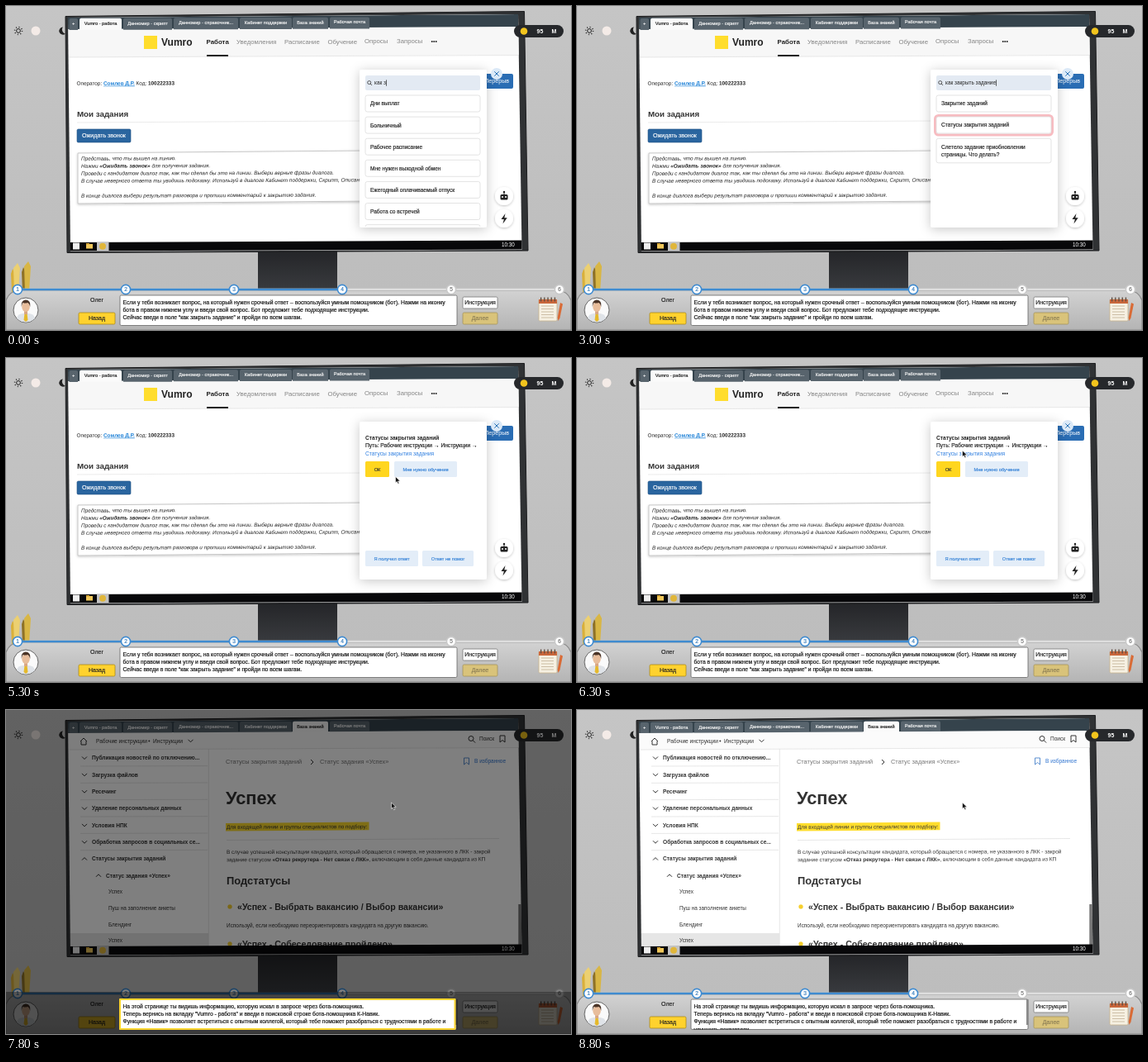
An HTML page that plays this animation: 684 by 392 pixels, repeating every 8900 ms.

```html
<!DOCTYPE html>
<html lang="ru">
<head>
<meta charset="utf-8">
<style>
html, body { margin: 0; width: 100%; height: 100%; overflow: hidden; background: #c3c3c3 }
svg { display: block; width: 100%; height: 100% }
text { font-family: "Liberation Sans", Arial, sans-serif; white-space: pre }
.m { stroke: currentColor; stroke-width: .18 }
.line { fill: none; stroke: #333; stroke-width: 1 }
</style>
</head>
<body>
<svg id="stage" viewBox="0 0 684 392"></svg>
<script>
const LOOP = 8900;
const $ = id => document.getElementById(id);
const clamp = v => Math.max(0, Math.min(1, v));
const ease = (t, a, b) => { const p = clamp((t - a) / (b - a)); return p * p * (3 - 2 * p); };

// y is the vertical middle of the line
const text = (x, y, size, str, fill = '#222', more = '') =>
  `<text x="${x}" y="${(y + size * .35).toFixed(2)}" font-size="${size}" fill="${fill}" color="${fill}" ${more}>${str}</text>`;
const rect = (x, y, w, h, fill, more = '') =>
  `<rect x="${x}" y="${y}" width="${w}" height="${h}" fill="${fill}" ${more}/>`;
const disc = (x, y, r, fill, more = '') => `<circle cx="${x}" cy="${y}" r="${r}" fill="${fill}" ${more}/>`;
const path = (d, more = '') => `<path d="${d}" ${more}/>`;
const line = (x1, y1, x2, y2, color = '#ddd', w = .7) =>
  path(`M${x1} ${y1}L${x2} ${y2}`, `stroke="${color}" stroke-width="${w}" fill="none"`);
const group = (id, body, more = '') => `<g id="${id}" ${more}>${body}</g>`;
const bold = 'font-weight="700"', mid = 'text-anchor="middle"', medium = 'class="m"';
const tilt = (x, y, a = -.2) => `transform="rotate(${a} ${x} ${y})"`;
const button = (x, y, w, h, label, fill, color, size, more = '') =>
  rect(x, y, w, h, fill, 'rx="1.5" ' + more) + text(x + w / 2, y + h / 2, size, label, color, mid + ' ' + medium);
const chevron = (x, y, up) => {
  const k = up ? -1 : 1;
  return path(`M${x - 3} ${y - 1.5 * k}l3 ${3 * k}l3 ${-3 * k}`, 'class="line"');
};
const lens = (x, y, r, w) => disc(x, y, r, 'none', `stroke="#333" stroke-width="${w}"`) +
  line(x + r * .7, y + r * .7, x + r * 1.7, y + r * 1.7, '#333', w);
const bookmark = (x, y, color) => path(`M${x - 3} ${y - 4}h6v8l-3 -2.5l-3 2.5z`, `fill="none" stroke="${color}"`);

const tabs = [[89, 51, 'Vumro - работа'], [142, 59, 'Данномир - скрипт'], [203, 78, 'Данномир - справочник...'],
  [283, 63, 'Кабинет поддержки'], [347, 43, 'База знаний'], [392, 48, 'Рабочая почта']];

function tabBar(active) {
  const tab = (x, w, label, on) => {
    const y = 14.9 - (x - 82) * .0045;
    return path(`M${x} ${y + 14}V${y + 2}q0 -2 2 -2h${w - 4}q2 0 2 2v12z`, `fill="${on ? '#fafafa' : '#58646d'}"`) +
      text(x + w / 2, y + 6, 5.65, label, on ? '#222' : '#f4f4f4', mid + ' ' + medium);
  };
  return path('M75 14L620 10V25L75 28z', 'fill="#35434c"') + tab(76.5, 10.5, '+', false) +
    tabs.map(([x, w, label], i) => tab(x, w, label, i === active)).join('');
}

function workPage() {
  const menu = [[279, 'Уведомления'], [337, 'Расписание'], [389.5, 'Обучение'], [434, 'Опросы'], [473, 'Запросы']];
  const brief = [[184.5, 'Представь, что ты вышел на линию.'],
    [193.5, `Нажми <tspan ${bold}>«Ожидать звонок»</tspan> для получения задания.`],
    [202.5, 'Проведи с кандидатом диалог так, как ты сделал бы это на линии. Выбери верные фразы диалога.'],
    [211.5, 'В случае неверного ответа ты увидишь подсказку. Используй в диалоге Кабинет поддержки, Скрипт, Описание вакансии.'],
    [229.5, 'В конце диалога выбери результат разговора и пропиши комментарий к закрытию задания.']];
  return path('M76 28L621 25V59L76 62z', 'fill="#f7f7f7"') + line(76, 62, 621, 59.5) + tabBar(0) +
    rect(167, 36, 16, 16, '#ffdd2d') + text(188, 44, 12, 'Vumro', '#222', bold) +
    text(242.5, 43.3, 7.9, 'Работа', '#222', bold) + rect(243, 59, 26, 2, '#222') +
    menu.map(([x, s]) => text(x, 43.4 - (x - 243) * .004, 7.75, s, '#858585')).join('') +
    text(514.5, 43, 7, '•••', '#222') +
    text(85.5, 93.6, 6.4, `Оператор: <tspan fill="#1a7fd6" text-decoration="underline" ${bold}>Сомлев Д.Р.</tspan> Код: <tspan ${bold}>100222333</tspan>`, '#222', tilt(86, 94)) +
    text(86, 131, 9.75, 'Мои задания', '#333', bold) + line(86, 141, 430, 139, '#e2e2e2') +
    button(86, 149, 65, 16, 'Ожидать звонок', '#2a659f', '#fff', 7.1, 'stroke="#1d4f80" stroke-width=".6"') +
    path('M87 178L560 174V235L87 239z', 'fill="#fff" stroke="#bbb" stroke-width=".8" filter="url(#soft)"') +
    brief.map(([y, s]) => text(91, y, 6.4, s, '#222', 'font-style="italic" ' + tilt(91, y))).join('') +
    rect(570, 82, 44, 18, '#2a6db4', 'rx="2"') + text(609, 91, 7.1, 'Перерыв', '#fff', 'text-anchor="end"');
}

function botPanel() {
  const item = (y, ...rows) => rect(435, y, 139, rows.length * 9.5 + 10.5, '#fff', 'rx="2.5" stroke="#dcdcdc" stroke-width=".8"') +
    rows.map((s, i) => text(441, y + 10.2 + i * 9.5, 6.55, s, '#222', medium)).join('');
  const all = ['Дни выплат', 'Больничный', 'Рабочее расписание', 'Мне нужен выходной обмен',
    'Ежегодный оплачиваемый отпуск', 'Работа со встречей', 'Смена графика'];
  const soft = (x, y, w, s) => button(x, y, w, 19, s, '#e3edf8', '#3c86d8', 5.7);
  const search = rect(435, 84, 139, 18, '#e3eaf3', 'rx="2"') + lens(439.7, 92.6, 2, .8) +
    text(446, 93, 6.4, '', '#222', 'id="query"') + rect(0, 89.4, .7, 7.4, '#222', 'id="caret"');
  return rect(428, 77, 154, 191, '#fff', 'rx="3" filter="url(#shade)"') +
    group('list', search +
      group('all', all.map((s, i) => item(108 + i * 26.1, s)).join(''), 'clip-path="url(#panel)"') +
      group('found', item(108, 'Закрытие заданий') +
        rect(433.5, 132.5, 142, 23.5, 'none', 'id="glow" rx="4" stroke="#f7bcc1" stroke-width="3"') +
        item(134, 'Статусы закрытия заданий')) +
      group('third', item(160.3, 'Слетело задание приобновлении', 'страницы. Что делать?'))) +
    group('detail', text(435, 97, 6.6, 'Статусы закрытия заданий', '#222', bold) +
      text(435, 106, 6.65, 'Путь: Рабочие инструкции → Инструкции →', '#222', medium) +
      text(435, 115.3, 6.65, 'Статусы закрытия задания', '#2f7fe0') +
      button(435, 125, 29, 19, 'ОК', '#ffd61f', '#333', 5.7) + soft(470, 125, 76, 'Мне нужно обучение') +
      soft(435, 233, 64, 'Я получил ответ') + soft(504, 233, 62, 'Ответ не помог')) +
    disc(594, 82, 7, '#dbe9f7') + path('M591.3 79.3l5.4 5.4m0 -5.4l-5.4 5.4', 'stroke="#2b74b8"') +
    [230, 257].map(y => disc(603, y, 11, '#fff', 'filter="url(#soft)"')).join('') +
    rect(598.5, 228, 9, 6.5, '#222', 'rx="1.5"') + rect(602.5, 224.5, 1, 4, '#222') + disc(603, 225, 1.2, '#222') +
    disc(601, 231, 1, '#fff') + disc(605, 231, 1, '#fff') + path('M604.5 251l-5 7h3.3l-1.3 5.5l5.2 -7.2h-3.4z', 'fill="#222"');
}

function basePage() {
  const side = ['Публикация новостей по отключению...', 'Загрузка файлов', 'Ресечинг', 'Удаление персональных данных',
    'Условия НПК', 'Обработка запросов в социальных се...', 'Статусы закрытия заданий'];
  const leaves = ['Успех', 'Пуш на заполнение анкеты', 'Блендинг', 'Успех'];
  const star = y => path([0, 45, 90, 135].map(a => {
    const c = 2.8 * Math.cos(a * Math.PI / 180), s = 2.8 * Math.sin(a * Math.PI / 180);
    return `M${271 - c} ${y - s}L${271 + c} ${y + s}`;
  }).join(''), 'stroke="#f6cf2e" stroke-width="1.5"');
  return tabBar(4) + path('M76 28L621 25V45L76 48z', 'fill="#fbfbfb"') + line(77, 48, 621, 45.5) +
    path('M90 38l4 -4l4 4M91 37.5v4.5h6v-4.5', 'class="line"') +
    text(109, 37.7, 6.55, 'Рабочие инструкции', '#333') + disc(173.3, 37.6, 1, '#333') +
    text(178, 37.4, 6.65, 'Инструкции', '#333') + chevron(223.5, 37.3) +
    lens(563, 34.5, 3, 1) + text(573, 35, 6.5, 'Поиск', '#333') + bookmark(601, 35, '#333') +
    rect(78, 270, 167, 17, '#e6e6e6') + line(245.3, 47, 245.3, 286) +
    side.map((s, i) => {
      const y = 58 + i * 20.35;
      return chevron(95, y, i === 6) + text(104, y, 6.6, s, '#333', bold) + (i < 6 ? line(90, y + 10, 244, y + 9.6) : '');
    }).join('') +
    chevron(112, 200.3, true) + text(121, 200.3, 6.55, 'Статус задания «Успех»', '#333', bold) +
    leaves.map((s, i) => text(124, 220 + i * 19.65, 6.4, s, '#333')).join('') +
    text(266, 62.8, 7.35, 'Статусы закрытия заданий', '#777') +
    path('M369 60l3 3l-3 3', 'class="line"') + text(380, 62.4, 7.4, 'Статус задания «Успех»', '#777') +
    bookmark(557.5, 62, '#5b8fd0') + text(567, 62, 6.5, 'В избранное', '#2f74d0') +
    text(266, 106, 21.8, 'Успех', '#333', bold) +
    path('M266 137L439.5 135.6V145.2L266 146.6z', 'fill="#ffdd2d"') +
    text(267, 141.5, 6.42, 'Для входящей линии и группы специалистов по подбору:', '#333', tilt(267, 141)) +
    line(267, 157.5, 597, 155.5) +
    text(267, 171.8, 6.47, 'В случае успешной консультации кандидата, который обращается с номера, не указанного в ЛКК - закрой', '#333', tilt(267, 172, -.12)) +
    text(267, 181, 6.47, `задание статусом <tspan ${bold}>«Отказ рекрутера - Нет связи с ЛКК»</tspan>, включающим в себя данные кандидата из КП`, '#333', tilt(267, 181, -.12)) +
    text(267, 206, 12.9, 'Подстатусы', '#333', bold) +
    star(238) + text(280, 238, 10.6, '«Успех - Выбрать вакансию / Выбор вакансии»', '#333', bold) +
    text(267, 260.5, 6.45, 'Используй, если необходимо переориентировать кандидата на другую вакансию.', '#333') +
    star(283) + text(280, 283, 10.6, '«Успех - Собеседование пройдено»', '#333', bold) +
    rect(620.3, 235, 4, 50, '#777');
}

function room() {
  return rect(0, 0, 684, 392, 'url(#wall)') +
    disc(15, 30, 2.4, 'none', 'stroke="#222"') + disc(15, 30, 4.5, 'none', 'stroke="#222" stroke-width="1.5" stroke-dasharray="1 2.53"') +
    disc(36, 30, 5.5, '#f4ebe7') + path('M69 25.5a4.6 4.6 0 1 0 3 8a5 5 0 0 1 -3 -8z', 'fill="#222"') +
    rect(305, 294, 96, 52, 'url(#stand)') +
    path('M72 12.5L627.5 6.5L632 296L74 298.5z', 'fill="#303234" stroke="#1c1d1f"') +
    path('M75 14L620 10L624.5 295L78 297z', 'fill="#fff"');
}

function taskbar() {
  return path('M77.5 286L624.4 283.5V294.5L78 296.5z', 'fill="#08080a"') + rect(81, 286.5, 8, 8, '#eee') +
    rect(97, 288, 8, 5.5, '#f0c75a') + rect(97, 287, 4, 2, '#d9a93b') + rect(110, 285.6, 14.5, 10.4, '#c4c4c4') +
    disc(117, 290.7, 4, '#e0b63a') + text(608, 288.6, 6.3, '10:30', '#fff', mid) +
    rect(615, 23, 60, 15, '#26282b', 'rx="7.5"') + disc(627, 30.5, 4.3, '#f2c41d') +
    text(646.5, 30.5, 7, '95', '#fff', mid + ' ' + bold) + text(663.5, 30.5, 7, 'М', '#fff', mid + ' ' + bold);
}

function footer() {
  const step = (x, i) => disc(x, 343, 5.6, '#fff', `stroke="${i < 4 ? '#3f8bd0' : '#c9c9c9'}" stroke-width="1.6"`) +
    text(x, 343, 6.6, i + 1, i < 4 ? '#357cbd' : '#777', mid + ' ' + medium);
  const pencils = [[8, 318, '#d9b03a'], [14, 311, '#ecd071'], [21, 316, '#8f7226'], [27, 309, '#d8b645']];
  return pencils.map(([x, y, c], i) => path(`M${x} ${y}l3 6l${i % 2 ? -2 : 1} ${340 - y}h-5l-1 ${y - 340}z`, `fill="${c}"`)).join('') +
    path('M0 392V356Q4 345 16 344H668Q680 345 684 356V392z', 'fill="url(#desk)" stroke="#8b8b8b" stroke-width="1.2"') +
    line(14, 343, 670, 343, '#dedede', 2.5) + line(14, 343, 407, 343, '#3f8bd0', 2.5) +
    [14, 145, 276, 407, 539, 670].map(step).join('') +
    disc(24, 368, 15, '#fafafa', 'stroke="#666" stroke-width="1"') +
    path('M13 378q1 -6 8 -6h6q7 0 8 6q-11 9 -22 0z', 'fill="#dfe3e8"') + path('M22.5 372h3l1 8l-2.5 2l-2.5 -2z', 'fill="#e5b92b"') +
    rect(22, 367, 4, 6, '#d9a784') + '<ellipse cx="24" cy="364" rx="4.8" ry="6" fill="#e8bd9b"/>' +
    path('M18.7 364q-1 -8 5.3 -8.5q6.3 .5 5.3 8.5q-1 -4 -3 -5q-4 1 -6 0q-1 2 -1.6 5z', 'fill="#4b3427"') +
    text(110, 356, 7, 'Олег', '#222', mid + ' ' + medium) +
    button(88, 371, 44, 14, 'Назад', '#ffd22e', '#222', 7, 'stroke="#a98a1c" stroke-width=".8"') +
    button(553, 352, 42, 14, 'Инструкция', '#fdfdfd', '#222', 7, 'stroke="#777" stroke-width=".8"') +
    button(553, 371, 42, 14, 'Далее', '#d9c37a', '#8a7d55', 7, 'stroke="#a4945c" stroke-width=".8"') +
    rect(645, 355, 22, 26, '#f6f0e2', 'rx="1.5" stroke="#c8b48d" stroke-width=".8"') + rect(645, 355, 22, 5, '#c9673c') +
    [0, 1, 2, 3, 4].map(i => rect(647 + i * 4.2, 352.5, 1.3, 5, '#5c4a40') + line(648, 363 + i * 3.5, 663, 363 + i * 3.5, '#bba88c')).join('') +
    path('M671 359l3 1.5l-3.5 17l-2 3.5l-.8 -4z', 'fill="#d96b36"');
}

function dialog() {
  const rows = list => list.map((s, i) => text(141.5, 358.3 + i * 9.35, 6.75, s, '#111', medium)).join('');
  return rect(138, 350, 408, 36.5, '#fff', 'rx="1.5" stroke="#666" stroke-width=".8"') +
    group('tip1', rows(['Если у тебя возникает вопрос, на который нужен срочный ответ – воспользуйся умным помощником (бот). Нажми на иконку',
      'бота в правом нижнем углу и введи свой вопрос. Бот предложит тебе подходящие инструкции.',
      'Сейчас введи в поле “как закрыть задание” и пройди по всем шагам.'])) +
    group('tip2', rows(['На этой странице ты видишь информацию, которую искал в запросе через бота-помощника.',
      'Теперь вернись на вкладку "Vumro - работа" и введи в поисковой строке бота-помощника К-Навик.',
      'Функция «Навик» позволяет встретиться с опытным коллегой, который тебе поможет разобраться с трудностями в работе и',
      'улучшить показатели.']) + rect(544, 350, 2.5, 31, '#8a8a8a'), 'clip-path="url(#tip)"');
}

const hole = 'M137.5 349.5V387H544.5V349.5z" fill-rule="evenodd';

$('stage').innerHTML = `<defs>
  <linearGradient id="wall" x2="0" y2="1"><stop stop-color="#c5c5c5"/><stop offset="1" stop-color="#bcbcbc"/></linearGradient>
  <linearGradient id="stand" x2="0" y2="1"><stop stop-color="#232427"/><stop offset="1" stop-color="#3a3c40"/></linearGradient>
  <linearGradient id="desk" x2="0" y2="1"><stop stop-color="#d2d2d2"/><stop offset="1" stop-color="#b4b4b4"/></linearGradient>
  <filter id="soft" x="-30%" y="-30%" width="160%" height="160%"><feDropShadow dx="0" dy="1" stdDeviation="1.5" flood-opacity=".25"/></filter>
  <filter id="shade" x="-20%" y="-20%" width="140%" height="140%"><feDropShadow dx="0" dy="2" stdDeviation="7" flood-opacity=".22"/></filter>
  <clipPath id="screen"><path d="M75 14L620 10L624.5 290L78 290z"/></clipPath>
  <clipPath id="panel"><path d="M428 77h154v190h-154z"/></clipPath>
  <clipPath id="tip"><path d="M138 350h409v36.5h-409z"/></clipPath></defs>` +
  room() + group('view', group('work', workPage() + botPanel()) + group('base', basePage()), 'clip-path="url(#screen)"') +
  taskbar() + footer() + dialog() +
  group('dim', path('M0 0H684V392H0z' + hole, 'fill-opacity=".5"') + path('M0 341H684V392H0z' + hole, 'fill-opacity=".35"')) +
  path('M138 350H543.5V386H138z', 'id="ring" fill="none" stroke="#ffd52e" stroke-width="2" stroke-linejoin="round" pathLength="1"') +
  '<rect id="pulse" fill="none" stroke="#ffd52e" stroke-width="2" rx="3"/>' +
  path('M0 0v7.5l1.8 -1.6l1.3 2.9l1.4 -.6l-1.3 -2.8h2.5z', 'id="mouse" fill="#111" stroke="#fff" stroke-width=".6"');

const show = (id, on) => { $(id).style.display = on ? '' : 'none'; };
const QUERY = 'как закрыть задание';

function typed(t) {
  if (t < 1000) return 5;
  if (t < 1300) return 6;
  return Math.min(QUERY.length, t < 1700 ? 7 + Math.floor((t - 1300) / 100) : 12 + Math.floor((t - 1700) / 100));
}

function draw(t) {
  const opened = t >= 6400, detail = t >= 4700;
  show('work', !opened);
  show('base', opened);
  show('tip1', !opened);
  show('tip2', opened);
  show('list', !detail);
  show('detail', detail);
  show('all', t < 500);
  show('found', t >= 500);
  show('third', t >= 2000);

  $('query').textContent = QUERY.slice(0, typed(t));
  if (!detail) $('caret').setAttribute('x', 446.3 + $('query').getComputedTextLength());
  show('caret', t < 3100 || t >= 3200);
  $('glow').setAttribute('opacity', ease(t, 500, 900) * (1 - ease(t, 3500, 4100)));

  // pointer goes from the search field to the result, then to the link
  const a = ease(t, 3400, 4150), b = ease(t, 5300, 6100);
  show('mouse', t >= 3400);
  $('mouse').setAttribute('transform', `translate(${508 - 36.5 * a - 5 * b} ${96 + 47.5 * a - 31.5 * b})`);

  const fade = opened ? 1 - ease(t, 8400, 8750) : 0;
  $('dim').setAttribute('opacity', fade);
  $('ring').setAttribute('opacity', fade);
  $('ring').setAttribute('stroke-dasharray', `${.42 + .58 * clamp((t - 6400) / 700)} 2`);

  const p = clamp((t - 7200) / 600), gap = 17 * p;
  show('pulse', p > 0 && p < 1);
  $('pulse').setAttribute('opacity', .6 * (1 - p));
  for (const [k, v] of Object.entries({ x: 138 - gap, y: 350 - gap, width: 406 + 2 * gap, height: 36 + 2 * gap }))
    $('pulse').setAttribute(k, v);
}

function tick(now) {
  draw(now % LOOP);
  requestAnimationFrame(tick);
}
draw(0);
requestAnimationFrame(tick);
</script>
</body>
</html>
```
